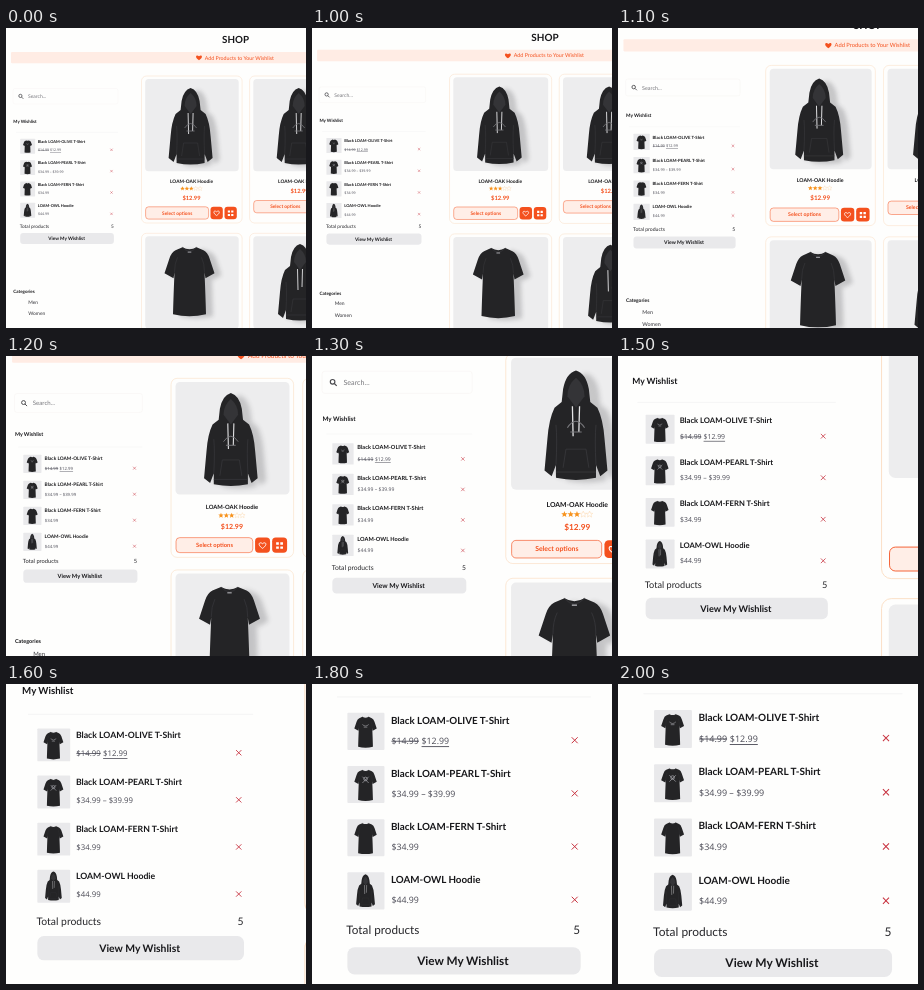
An HTML page that plays this animation: 300x300 px, repeating every 3.1 s.

```html
<!DOCTYPE html>
<html lang="en">
<head>
<meta charset="utf-8">
<title>Shop wishlist zoom</title>
<style>
html, body { margin: 0; width: 100%; height: 100%; overflow: hidden; background: #fefefd; }
svg { display: block; width: 100%; height: 100%; font-family: Lato, sans-serif; text-rendering: geometricPrecision; }
#page { transform-origin: 0 165.8px; animation: zoom 3100ms step-end infinite; }
.bold { font-weight: 700; }
.mid { text-anchor: middle; }
.price { font: 400 3.54px "Open Sans", sans-serif; fill: #4a4a55; }
.was { text-decoration: line-through; }
.now { text-decoration: underline; }
.accent { fill: #f4511e; }
.cloth { fill: #242426; }
.seam { fill: none; stroke: #38383b; stroke-width: .6; }
.photo { fill: #ededee; }
.panel { fill: #e9e9eb; }
@keyframes zoom {
  0% { transform: scale(1); }
  32.258% { transform: scale(1.015); }
  35.484% { transform: scale(1.09); }
  38.71% { transform: scale(1.218); }
  41.935% { transform: scale(1.43); }
  45.161% { transform: scale(1.67); }
  48.387% { transform: scale(1.945); }
  51.613% { transform: scale(2.206); }
  54.839% { transform: scale(2.375); }
  58.065% { transform: scale(2.49); }
  61.29% { transform: scale(2.53); }
  64.516%, 100% { transform: scale(2.54); }
}
</style>
</head>
<body>
<svg viewBox="0 0 300 300">
  <defs>
    <path id="heart" d="M0 2.6C-5-.6-2.6-3.6 0-1.4 2.6-3.6 5-.6 0 2.6Z"/>
    <path id="star" d="M0-2.3.6-.8 2.2-.7 1 .3 1.4 1.9 0 1-1.4 1.9-1 .3-2.2-.7-.6-.8Z"/>
    <g id="tee">
      <path class="cloth" d="M-7 0Q0 4 7 0L14 3Q18 5 20 11L25 26 16 31 15 25Q16 48 16.5 67 0 71-16.5 67-16 48-15 25L-16 31-25 26-20 11Q-18 5-14 3Z"/>
      <path class="seam" d="M-7 0Q0 8 7 0M-15 25Q-15 16-12 10M15 25Q15 16 12 10"/>
    </g>
    <g id="hoodie">
      <path class="cloth" d="M0 0Q7 2 9 13L10 22 15 26Q19 34 20 48L22 70 17 74 14 66 14 75Q0 78-14 75L-14 66-17 74-22 70-20 48Q-19 34-15 26L-10 22-9 13Q-7 2 0 0Z"/>
      <path d="M0 5Q6 10 6 18L0 26-6 18Q-6 10 0 5Z" fill="#343437"/>
      <path class="seam" d="M-14 66Q-13 48-14 38M14 66Q13 48 14 38M-9 68-7 55H7L9 68M-14 71H14"/>
      <path d="M-2.5 25-2 46M2.5 25 2 43" fill="none" stroke="#e4e4e6" stroke-width=".9"/>
    </g>
    <path id="badge" d="M-6 40Q0 31 6 40M-4 43H4" fill="none" stroke="#77777b" stroke-width=".8"/>
    <g id="emblem" fill="none" stroke="#aaaab0" stroke-width="1.5">
      <path d="M-7 15 7 29M7 15-7 29"/><circle cy="20" r="4"/>
    </g>
    <path id="stripe" d="M-7 17Q0 24 7 17M-4 23H4" fill="none" stroke="#9b9ba0" stroke-width="1.5"/>
    <filter id="soft" x="-30%" y="-30%" width="160%" height="160%"><feGaussianBlur stdDeviation="2"/></filter>
  </defs>
  <g id="page"></g>
</svg>
<script>
const text = (x, y, size, content, cls = "", fill = "#17171a") =>
  `<text x="${x}" y="${y}" font-size="${size}" class="${cls}" style="fill:${fill}">${content}</text>`;
const box = (x, y, w, h, r, attrs) =>
  `<rect x="${x}" y="${y}" width="${w}" height="${h}" rx="${r}" ${attrs}/>`;
const use = (id, x, y, scale = 1, attrs = "") =>
  `<use href="#${id}" transform="translate(${x} ${y}) scale(${scale})" ${attrs}/>`;
const orange = "#f4511e";

function header() {
  return text(229.5, 15, 9.8, "SHOP", "bold mid") +
    box(5, 24, 310, 11.2, 1, 'fill="#ffece4"') +
    use("heart", 193, 29.7, 1, 'class="accent"') +
    text(198.7, 31.5, 5.3, "Add Products to Your Wishlist", "", orange);
}

function wishRow([name, price, shape, mark], i) {
  const y = i * 21.35;
  const scale = shape === "tee" ? 0.18 : 0.172;
  const top = shape === "tee" ? 112.4 : 111.6;
  return `<g transform="translate(0 ${y})">` +
    box(14.2, 110.8, 14.9, 14.9, 0.4, 'class="panel"') +
    use(shape, 21.5, top, scale) +
    (mark ? use(mark, 21.5, top, scale) : "") +
    text(31.7, 115.1, 3.94, name, "bold") +
    `<text x="31.9" y="123.2" class="price">${price}</text>` +
    `<path d="M104.3 120.6l2.4 2.4m0-2.4l-2.4 2.4" stroke="#c8323f" stroke-width=".4"/></g>`;
}

function sidebar() {
  const rows = [
    ["Black LOAM-OLIVE T-Shirt", '<tspan class="was">$14.99</tspan><tspan class="now" x="44">$12.99</tspan>', "tee", "stripe"],
    ["Black LOAM-PEARL T-Shirt", "$34.99 – $39.99", "tee", "emblem"],
    ["Black LOAM-FERN T-Shirt", "$34.99", "tee"],
    ["LOAM-OWL Hoodie", "$44.99", "hoodie"]
  ];
  return box(7, 60.5, 105, 15.5, 2, 'fill="none" stroke="#f6f3f1" stroke-width=".4"') +
    '<g fill="none" stroke="#4a4a4e" stroke-width=".8"><circle cx="14.4" cy="67.9" r="1.6"/><path d="M15.6 69.1l1.7 1.7"/></g>' +
    text(22, 70.2, 5, "Search...", "", "#77777c") +
    text(7.3, 95.2, 4.4, "My Wishlist", "bold") +
    '<path d="M10 104.4H112" stroke="#f3f3f3" stroke-width=".4"/>' +
    rows.map(wishRow).join("") +
    text(13.8, 199.7, 4.72, "Total products", "", "#26262a") +
    text(104.9, 199.7, 4.72, "5", "", "#26262a") +
    box(14.2, 204.9, 93.7, 11, 3, 'class="panel"') +
    text(60.6, 212.1, 4.72, "View My Wishlist", "bold mid") +
    text(7.3, 265.2, 4.5, "Categories", "bold") +
    text(22.3, 275.8, 4.9, "Men", "", "#333338") +
    text(22.3, 286.8, 4.9, "Women", "", "#333338");
}

function card(x, y, shape, cx, top, extra = "") {
  return box(x - 3.7, y - 3, 100.6, 147, 5, 'fill="none" stroke="#fbdfc6" stroke-width=".5"') +
    box(x, y, 93.5, 92.3, 3.5, 'class="photo"') +
    use(shape, cx + 7, top + 2, 1, 'opacity=".2" filter="url(#soft)"') +
    use(shape, cx, top) + extra;
}

function details(x, rated) {
  const mid = x + 46.3;
  const lift = rated ? 0 : -6.3;
  const stars = rated ? [0, 1, 2, 3, 4].map(i =>
    use("star", mid - 9 + i * 4.4, 160.6, 1, i < 3 ? 'fill="#f7931e"' : 'fill="#fff" stroke="#f9cf9f" stroke-width=".3"')).join("") : "";
  return text(mid, 155.2, 4.8, "LOAM-OAK Hoodie", "bold mid") + stars +
    `<g transform="translate(${x} ${lift})">` +
    text(46.3, 171.6, 5.8, "$12.99", "bold mid", orange) +
    box(0.4, 178.8, 63, 12.3, 3, `fill="#ffeee7" stroke="${orange}" stroke-width=".45"`) +
    text(32, 186.5, 4.8, "Select options", "bold mid", orange) +
    box(65.3, 178.7, 12.3, 12.5, 3, 'class="accent"') +
    box(79.3, 178.7, 12.3, 12.5, 3, 'class="accent"') +
    use("heart", 71.4, 185.1, 0.95, 'fill="none" stroke="#fff" stroke-width=".8"') +
    '<path d="M82.6 182.6h2.2v2h-2.2zm3.4 0h2.2v2H86zm-3.4 3.4h2.2v2h-2.2zm3.4 0h2.2v2H86z" fill="#fff"/></g>';
}

function products() {
  return card(139.2, 51, "hoodie", 184.6, 60, use("badge", 184.6, 60)) + details(139.2, true) +
    card(247.3, 51, "hoodie", 292.7, 60, use("badge", 292.7, 60)) + details(247.3, false) +
    card(139.2, 208.3, "tee", 183.5, 219.3, box(181.7, 223.6, 3.6, 1, 0, 'fill="#a5a5aa"')) +
    card(247.3, 208.3, "hoodie", 294, 216);
}

document.getElementById("page").innerHTML = header() + sidebar() + products();
</script>
</body>
</html>
```
